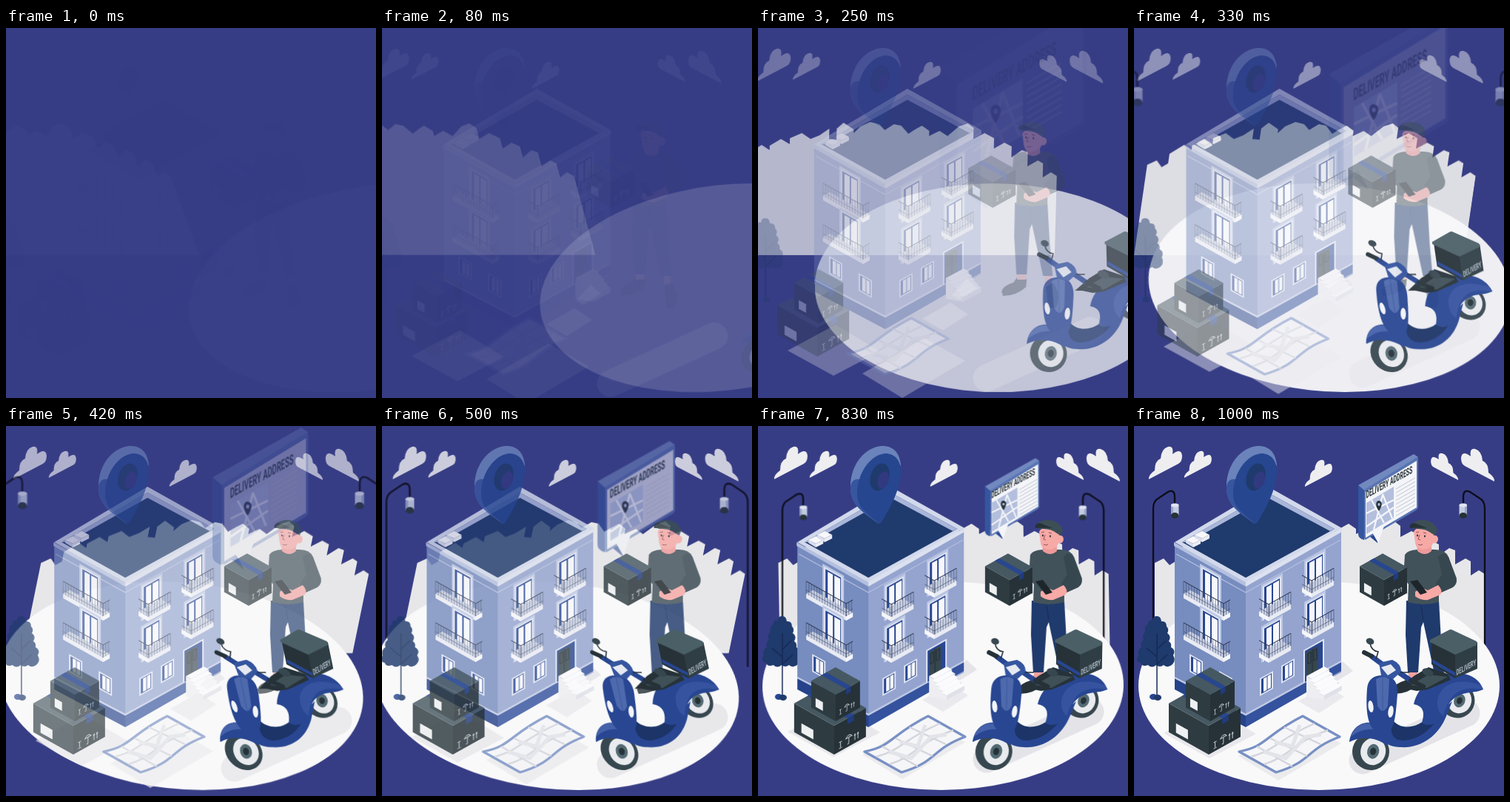
These frames come from a looping animation (500x500 px, 1040 ms). An HTML page:

```html
<!DOCTYPE html>
<html lang="en">
<head>
<meta charset="utf-8">
<title>Delivery address</title>
<style>
html,body{margin:0;width:100%;height:100%;overflow:hidden;background:#373d85}
svg{display:block;width:100vw;height:100vh}
text{font-family:Roboto,"Liberation Sans",sans-serif;font-weight:700}
</style>
</head>
<body>
<svg id="stage" viewBox="0 0 500 500"></svg>
<script>
const BLUE = '#284692', NAVY = '#1f3a6c', MID = '#6a83bb', INK = '#263238', SLATE = '#37474f';
const SLOPE = 0.56;

const poly = (pts, fill, extra = '') => `<polygon points="${pts}" fill="${fill}" ${extra}/>`;
const path = (d, fill, extra = '') => `<path d="${d}" fill="${fill}" ${extra}/>`;
const line = (d, stroke, w = 1, extra = '') => path(d, 'none', `stroke="${stroke}" stroke-width="${w}" ${extra}`);
const rect = (x, y, w, h, fill) => `<rect x="${x}" y="${y}" width="${w}" height="${h}" fill="${fill}"/>`;
const oval = (x, y, rx, ry, fill, turn = 0) =>
  `<ellipse cx="${x}" cy="${y}" rx="${rx}" ry="${ry}" fill="${fill}" transform="rotate(${turn} ${x} ${y})"/>`;
const group = (id, body) => `<g id="${id}">${body}</g>`;
// dir 1 slopes down to the right, -1 slopes up
const face = (x, y, dir, body) => `<g transform="matrix(1 ${dir * SLOPE} 0 1 ${x} ${y})">${body}</g>`;

const city = () => path(
  'M28 307V185L40 179 48 188 56 183V170L74 158 85 165V159L100 150 112 157V149L128 142 140 150 152 145 165 136V150L175 151V136L184 128 198 137V142L207 133 220 127 232 130 240 138 252 130 262 132 272 143 281 137 290 132 300 139V146L314 139 325 146 340 133 352 129 360 135V150L375 142 388 149V163L402 155 412 160V175L426 165 434 168V187L448 179 455 183V202L466 195 474 200V307Z',
  '#e7e7ea');

function cloud(x, y, k, flip = 1) {
  return `<g transform="matrix(${k * flip} ${-k * 0.5} 0 ${k} ${x} ${y})">` +
    path('M0 0Q-1-6 8-8Q8-21 16-20Q17-33 26-31Q34-29 32-18Q44-21 45-9Q45-1 40-1Z', '#eeeef1') + '</g>';
}
const clouds = () => cloud(20, 72, 1) + cloud(68, 70, .82) + cloud(231, 82, .82) +
  cloud(487, 75, 1, -1) + cloud(438, 73, .82, -1);

const lamp = () =>
  line('M26 315V111Q26 101 34 97L46 89Q55 85 55 96V106', '#0c0d18', 2.3) +
  rect(50, 106, 10.5, 15, '#c3cbe0') + rect(50, 106, 3, 15, '#98a6c8') +
  oval(55.2, 107, 5.2, 2.5, '#dfe4f0') + oval(55.2, 121, 5.2, 4, INK);
const lamps = () => lamp() + `<g transform="translate(500) scale(-1 1)">${lamp()}</g>`;

const shadows = () =>
  poly('40,415 105,380 165,416 102,449', '#e8e8ec') +
  poly('141,446 225,398 280,429 195,479', '#ebebee') +
  poly('222,372 260,350 284,366 250,388', '#eaeaee') +
  poly('262,340 282,318 296,331 272,346', '#e4e4e9') +
  line('M309 452L449 388', '#e4e4e8', 37, 'stroke-linecap="round"');

const tree = () =>
  path('M30 257Q36 256 37 264Q44 263 44 271Q48 274 45 280Q51 284 47 291Q51 293 50 299Q57 303 53 310Q57 317 52 322Q46 328 40 323Q35 327 30 323Q24 328 19 323Q11 326 9 320Q1 318 6 310Q4 303 10 299Q8 293 13 289Q10 282 15 279Q13 271 19 268Q19 261 25 263Q25 257 30 257Z', NAVY) +
  line('M31 280V368M31 312L17 300M31 302L43 290M31 322L45 309', '#162a55', 1.5) +
  oval(26, 366, 5, 4, BLUE) + oval(32, 367, 5, 4, NAVY);

const tallWindow = (x, y, dir) => face(x, y, dir,
  rect(0, 0, 29, 49, '#bcc7e4') + rect(2, 3, 25, 46, '#dfe4f2') +
  rect(4, 5, 21, 44, BLUE) + rect(7, 7, 7, 42, '#f7f8fc') + rect(16, 7, 8, 42, '#f7f8fc'));
const smallWindow = (x, y, dir) => face(x, y, dir,
  rect(0, 0, 18, 24, '#dfe4f2') + rect(2, 2, 14, 20, BLUE) +
  rect(5, 3, 4.5, 18, '#f7f8fc') + rect(10.5, 3, 4.5, 18, '#f7f8fc'));

// (x, y) is the nearest floor corner
function balcony(x, y, long, short, flip) {
  const a = -long * SLOPE, b = -short * SLOPE;
  let bars = `M${-long} ${a - 17}L0-17L${short} ${b - 17}M${-long} ${a - 5}L0-5L${short} ${b - 5}`;
  for (let s = -long; s <= short; s += 3.6) bars += `M${s} ${-Math.abs(s) * SLOPE}v-17`;
  return `<g transform="translate(${x} ${y}) scale(${flip} 1)">` +
    poly([-long, a, 0, 0, short, b, short - long, a + b], '#cdd4e8') +
    poly([-long, a, 0, 0, 0, 6, -long, a + 6], '#e9ebf3') +
    poly([0, 0, short, b, short, b + 6, 0, 6], '#f5f6fa') +
    line(bars, '#3b4763', .6) + line(`M${-long} ${a - 17}L0-17L${short} ${b - 17}M0 0v-17`, '#2f3a55', .9) + '</g>';
}

function building() {
  let s = poly('55,160 151,213 151,405 55,352', '#778cbf') + poly('151,213 280,141 280,333 151,405', '#94a4cf') +
    poly('55,341 151,391 151,407 55,356', '#25428a') + poly('151,391 238,343 238,357 151,407', '#34529d') +
    poly('258,331 280,319 280,331 262,341', '#34529d') +
    line('M55 340L151 390L238 342M258 330L280 318', '#bfc9e5', 2.5) +
    line('M57 173L151 225L279 154', '#b3bfe0', 1.2) +
    poly('181,82 281,138 151,211 55,157', '#d2d9ec') +
    poly('181,90 271,139 151,205 65,157', NAVY) +
    poly('181,90 271,139 265,142 181,97 74,157 65,157', '#a9b6d9') +
    poly('54,157 151,211 151,217 54,162', '#b4c0df') + poly('151,211 281,138 281,143 151,217', '#dce1f0');
  for (const [x, y] of [[70, 154], [82, 147]])
    s += poly([x, y, x + 10, y - 5, x + 20, y, x + 10, y + 5], '#f8f8fb') +
      poly([x, y, x + 10, y + 5, x + 10, y + 10, x, y + 4], '#d9dded') +
      poly([x + 10, y + 5, x + 20, y, x + 20, y + 5, x + 10, y + 10], '#eceef5');
  for (const y of [0, 56]) {
    s += tallWindow(89, 186 + y, 1) + balcony(121, 257 + y, 54, 9, 1);
    s += tallWindow(172, 215 + y, -1) + balcony(182, 258 + y, 30, 13, -1);
    s += tallWindow(230, 182 + y, -1) + balcony(240, 226 + y, 30, 13, -1);
  }
  s += smallWindow(75, 308, 1) + smallWindow(115, 331, 1) + smallWindow(170, 341, -1) + smallWindow(199, 324, -1);
  s += face(229, 303, -1, rect(0, 0, 28, 44, '#dfe4f2') + rect(2, 2, 24, 42, BLUE) +
    rect(4, 5, 16, 39, SLATE) + line('M12 5V44M6 8h4v14h-4zM14 8h4v14h-4z', '#1c272c', .8));
  for (let i = 0; i < 5; i++) {
    const x = 233 + i * 4.2, y = 338 + i * 5.5;
    s += poly([x, y, x + 24, y - 13, x + 31, y - 9, x + 7, y + 4], '#fbfbfd') +
      poly([x + 7, y + 4, x + 31, y - 9, x + 31, y - 3, x + 7, y + 10], '#dfe0e8') +
      poly([233, y, x + 7, y + 4, x + 7, y + 10, 233, y + 6], '#eeeef2');
  }
  return s;
}

const pin = () =>
  path('M125 82C125 53 143 30 166 27C181 26 191 34 193 52L163 132C143 117 125 108 125 82Z', MID) +
  path('M125 82Q127 70 137 72L163 132C143 117 125 108 125 82Z', '#37569f') +
  path('M134 92C134 63 152 39 172 37C188 37 194 51 193 64C191 88 180 108 167 130Q165 133 162 131C150 119 134 112 134 92Z', '#264690') +
  oval(164.5, 69, 12.5, 19, NAVY, 18) + oval(169, 73, 7.5, 12, '#31397f', 18);

function box(x, y, l, r, h) {
  const a = y - l * SLOPE, b = y - r * SLOPE;
  const strip = f => [x + r * f, y - r * f * SLOPE];
  const [p, q] = [strip(.42), strip(.62)];
  const marks = 'M0 0v7M-2 0h4M-2 8h4M7 0q4-6 8 0zM11-1v8q0 2-2 1M19 0v8M23 0v8M18 2l1-2 1 2M22 2l1-2 1 2';
  return poly([x - l, a, x, y, x, y + h, x - l, a + h], '#2e3c42') +
    poly([x, y, x + r, b, x + r, b + h, x, y + h], INK) +
    poly([x - l, a, x, y, x + r, b, x + r - l, a + b - y], '#465861') +
    poly([...p, ...q, q[0] - l, q[1] - l * SLOPE, p[0] - l, p[1] - l * SLOPE], '#28478f') +
    poly([...p, ...q, q[0], q[1] + 8, p[0], p[1] + 8], '#213c7c') +
    face(x - l * .82, a + l * .18 * SLOPE + h * .55, 1, rect(0, 0, l * .3, h * .33, '#eef0f2')) +
    `<g transform="translate(${x + r * .2} ${y + h * .56}) scale(${r / 42}) skewY(-29)">${line(marks, '#c3ccd0', 1)}</g>`;
}
const stack = () => box(101, 405, 54, 43, 39) + box(103, 363, 33, 33, 36);

const paper = () =>
  path('M142 440C178 434 178 417 228 392L278 420C232 437 240 454 192 468Z', '#f6f6f8',
    'stroke="#7890c4" stroke-width="3.2" stroke-linejoin="round"') +
  line('M158 447C194 437 193 424 244 402M176 457C212 446 210 430 262 411M166 433L214 460M184 422L234 446M203 407L252 430', '#d3d5dc', 2.4) +
  line('M175 440L205 449L232 420L253 417M190 427L214 433L224 404', '#e3e4e9', 5);

const bubble = () =>
  poly('303,80 378,38 384,42 311,87', '#7189bf') + path('M303 80L311 87V154Q303 152 303 146Z', '#35559f') +
  poly('317,148 329,158 331,143', BLUE) +
  path('M311 88Q311 86 313 85L381 43Q384 41 384 45V110Q384 112 381 114L314 153Q311 155 311 151Z', '#5874b3') +
  poly('313,89 382,47 382,110 313,151', '#f4f5f9') + poly('322,144 330,158 338,135', '#f4f5f9');
function bubbleInk() {
  let rows = '';
  for (let i = 0; i < 8; i++) rows += `M354 ${85 + i * 5.2}l26-15`;
  return `<text transform="matrix(.49 -.27 0 1 313.5 98)" font-size="14" fill="${INK}">DELIVERY ADDRESS</text>` +
    poly('314,104 351,82 351,124 314,146', '#b3bfdd') +
    line('M314 118L351 100M314 136L351 110M321 100L338 131M336 92L349 125M324 140L336 93', '#f4f5f9', 2.2) +
    line(rows, '#c2c5cf', 1) +
    path('M331 115C325 107 327 101 331 101C336 102 336 107 331 115Z', INK) + oval(331, 106, 1.6, 2, '#b3bfdd');
}

const man = () =>
  path('M350 356Q352 348 366 344L371 337L384 339L383 350Q370 362 352 362Z', INK) +
  path('M410 350L420 344L426 356Q428 374 422 379L413 377Z', INK) +
  rect(371, 326, 12, 14, '#f2a19f') + rect(409, 328, 9, 18, '#f2a19f') +
  path('M368 236H412L415 290L419 335H406L391 265L388 272L384 333H370L367 282Z', NAVY) +
  line('M391 262L388 243', '#172c59', 1) +
  path('M366 174Q369 168 383 167H407Q421 167 425 177L436 206Q436 215 428 219L412 226V238Q391 244 370 238L371 214L364 205Z', '#42525a') +
  path('M411 177L416 201L408 212L413 226L431 218Q438 213 435 205L425 177Q418 168 411 177Z', SLATE) +
  path('M382 160L402 157V169Q393 177 383 169Z', '#ee9a9a') +
  path('M378 143Q380 137 392 138L405 143V156Q402 167 391 167Q381 166 380 158Z', '#f7a9a6') +
  oval(406, 153, 5, 5.5, '#f7a9a6') +
  path('M373 137Q374 129 387 127Q405 126 410 141L407 148L402 145Q394 138 380 139Z', '#3c4f55') +
  path('M373 138Q371 132 379 131L396 138Q384 137 373 138Z', INK) +
  line('M381 144l4-1M391 144l4 1M386 147l-2 6 3 1M384 160q3 2 6 0', '#8a4a54', .9) +
  oval(383, 148, 1, 1.4, INK) + oval(393, 149, 1, 1.4, INK) +
  box(338, 208, 33, 31, 35) +
  path('M380 224Q389 217 397 222L411 215Q418 222 414 228L397 235Q387 236 380 230Z', '#f7a9a6') +
  poly('373,210 383,208 396,225 387,228', '#1d262b');

const wheel = (x, y, k, turn) => `<g transform="translate(${x} ${y}) rotate(${turn}) scale(${k})">` +
  oval(0, 0, 25, 25, SLATE) + oval(3, -1, 17, 18.5, '#e9ebef') + oval(3, -1, 8, 10, '#546a73') + oval(3, -1, 4, 5, INK) + '</g>';

const scooter = () =>
  wheel(437, 371, .94, 22) +
  path('M340 396C352 418 384 412 398 398L430 372L422 392C411 420 386 436 360 434C338 434 329 420 334 404Z', BLUE) +
  path('M350 398C362 412 385 408 398 392L404 374L414 388C404 410 384 424 364 425C350 425 344 414 350 398Z', '#1c3467') +
  path('M378 376C384 350 406 334 438 334C458 335 468 345 472 356C461 361 451 359 442 363C425 369 422 382 418 393C408 404 396 407 389 401C394 386 390 378 378 376Z', BLUE) +
  path('M411 366C418 347 440 340 468 350L472 356C450 353 428 352 418 392Q407 384 411 366Z', '#3653a0') +
  path('M358 355L378 338L398 326L424 335L428 343L397 356L382 358L368 355Z', INK) +
  path('M374 350L398 336L424 339L396 354Z', '#3f5057') + oval(397, 333, 8, 5, SLATE, 25) +
  poly('402,290 434,307 434,341 402,322', INK) + poly('434,307 464,292 464,328 434,341', '#2f3e45') +
  path('M400 289L425 276Q428 274 431 276L463 291V296L434 309L400 292Z', '#4b5f67') +
  poly('403,315 434,333 434,338 403,320', BLUE) +
  '<text transform="matrix(.54 -.29 0 1 435.5 337)" font-size="11" fill="#aeb9c4">DELIVERY</text>' +
  wheel(320, 440, 1, 14) +
  path('M291 427C293 409 306 399 321 401C337 404 345 414 342 432C329 421 308 418 291 427Z', BLUE) +
  path('M293 420C297 406 309 400 322 402Q334 405 338 414C322 406 305 410 293 420Z', '#4461aa') +
  path('M315 355C316 341 326 336 338 337C351 338 357 347 356 362C354 386 353 404 345 414Q333 420 325 412C315 402 313 382 315 355Z', BLUE) +
  path('M327 342Q337 336 345 342L343 378Q336 392 329 378Z', '#4e6aad') + line('M336 340V384', '#3a589f', 1) +
  oval(320, 379, 3.5, 8, '#f3f4f8', -8) + oval(347, 386, 3.6, 8, '#f3f4f8', 8) +
  line('M322 312L337 323L358 333L374 344', BLUE, 7, 'stroke-linecap="round"') +
  path('M331 320L349 316Q361 321 361 332L350 342L334 337Z', '#35559f') + poly('334,326 347,322 354,330 343,337', '#e6e9f1') +
  line('M311 306L321 311M374 344L391 352', INK, 6, 'stroke-linecap="round"') +
  line('M319 294Q321 304 330 305L327 315M360 333L372 333', INK, 1.6) + oval(319, 291, 5.5, 4.2, SLATE, 20);

const stage = document.getElementById('stage');
stage.innerHTML =
  group('city', city()) + group('clouds', clouds()) + group('lamps', lamps()) +
  group('floor', oval(250, 351, 244, 141, '#f9f9fa')) + group('shadows', shadows()) +
  group('tree', tree()) + group('building', building()) + group('pin', pin()) +
  group('stack', stack()) + group('paper', paper()) +
  group('sign', group('signInner', group('bubble', bubble()) + bubbleInk())) +
  group('man', man()) + group('scooter', scooter());

const easing = 'cubic-bezier(.36,-.01,.5,1.38)';
const runs = [];
function play(id, frames, origin = '0 0') {
  const el = document.getElementById(id);
  el.style.transformOrigin = origin;
  const run = el.animate(frames.map(f => ({ ...f, easing })), { duration: 1000, fill: 'both' });
  run.pause();
  runs.push(run);
}
const slide = (id, dx, dy = 0) => play(id, [
  { opacity: 0, transform: `translate(${dx}px,${dy}px)` }, { opacity: 1, transform: 'translate(0px,0px)' }]);
const shrink = (id, origin) => play(id, [
  { opacity: 0, transform: 'scale(1.5)' }, { opacity: 1, transform: 'scale(1)' }], origin);
// rush in from one side, lean past upright, then settle
const rush = (id, side, cy) => play(id, [
  [0, 250, -20], [.6, 0, 10], [.8, 0, -2], [1, 0, 0]
].map(([offset, x, lean]) => ({
  offset, opacity: offset ? 1 : 0, transform: `translateX(${side * x}px) skewX(${side * lean}deg)`
})), `250px ${cy}px`);

rush('city', -1, 215);
rush('floor', 1, 351);
rush('scooter', 1, 370);
for (const id of ['clouds', 'tree', 'stack', 'paper', 'man']) slide(id, -30);
slide('building', 30);
slide('pin', 0);
slide('shadows', 0, 30);
shrink('lamps', '250px 200px');
// the sign's shrink compounds through its nested layers
for (const id of ['sign', 'signInner', 'bubble']) shrink(id, '343px 98px');

const LOOP = 1040, STEP = 1000 / 24, start = performance.now();
function draw() {
  const t = (performance.now() - start) % LOOP;
  const n = Math.min(24, Math.floor((t + 4) / STEP));
  for (const run of runs) run.currentTime = Math.min(1000, (n + 1) * STEP);
  requestAnimationFrame(draw);
}
draw();
</script>
</body>
</html>
```
